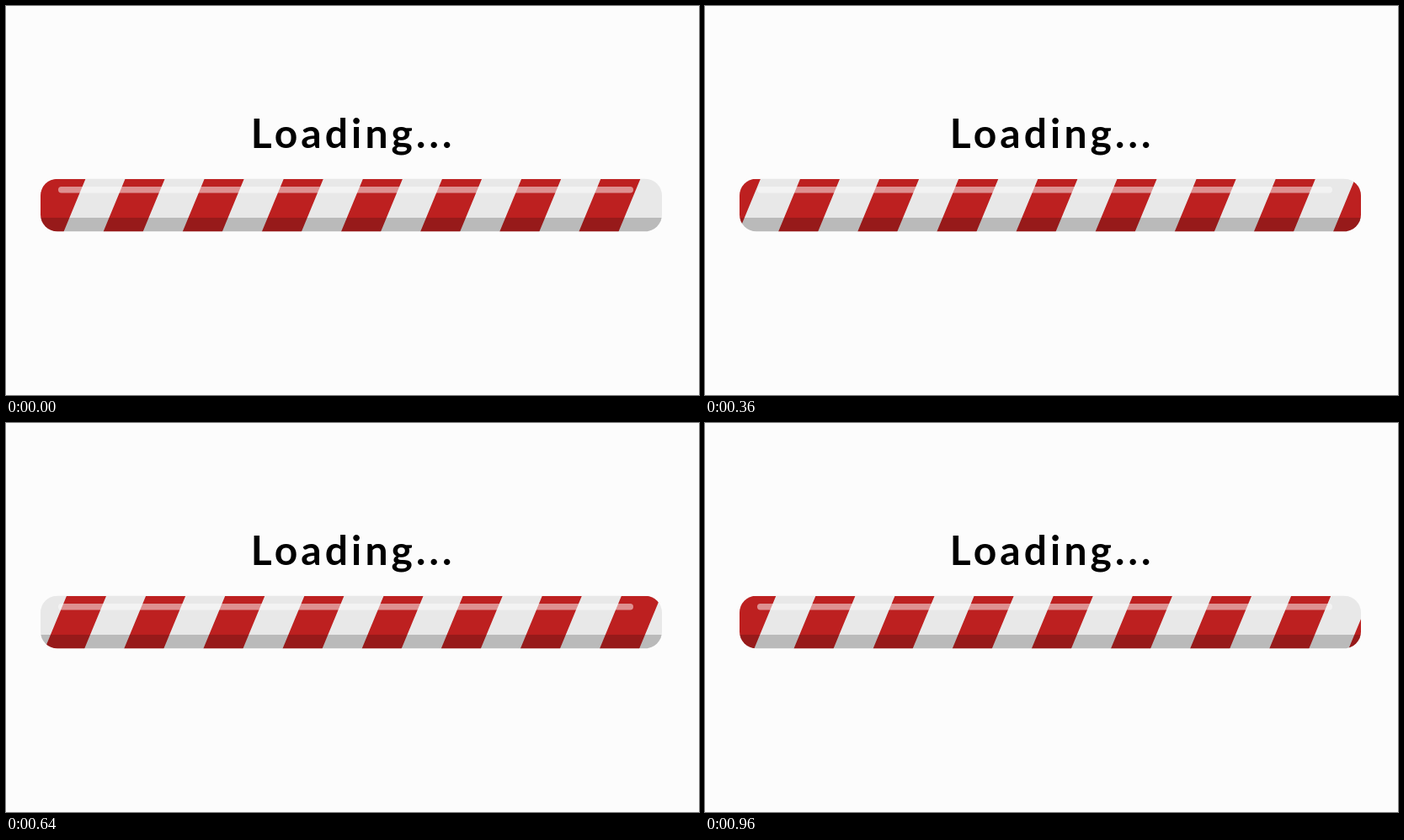
An HTML page for the animation above (1 s loop, 823 by 463 pixels).

```html
<!DOCTYPE html>
<html lang="en">
<head>
<meta charset="utf-8">
<title>Loading</title>
<style>
  html, body { margin: 0; width: 100%; height: 100%; overflow: hidden; background: #fcfcfc; }
  svg { display: block; width: 823px; height: 463px; }
  text { font: bold 48px Lato, sans-serif; letter-spacing: 4.1px; text-anchor: middle; }
</style>
</head>
<body>
<svg viewBox="0 0 823 463">
  <clipPath id="bar"><rect x="41" y="205.7" width="738" height="62.6" rx="20"/></clipPath>
  <text x="412.2" y="169.3">Loading...</text>
  <g clip-path="url(#bar)">
    <rect x="41" y="205" width="738" height="64" fill="#e8e8e8"/>
    <path id="stripes" fill="#bd2020"/>
    <rect x="41" y="252" width="738" height="17" opacity=".2"/>
  </g>
  <rect x="62" y="215" width="683" height="7.4" rx="3.7" fill="#fff" opacity=".5"/>
</svg>
<script>
  const LOOP = 1000, TICK = 40, PERIOD = 94.13, SPEED = 3.125;
  const stripes = document.getElementById('stripes');

  let d = '';
  for (let i = -2; i < 9; i++) {
    d += `M${47.3 + i * PERIOD} 206h${PERIOD / 2}l-26 63h${-PERIOD / 2}z`;
  }
  stripes.setAttribute('d', d);

  function draw(now) {
    const tick = Math.floor(now % LOOP / TICK);
    // 60 Hz motion sampled every 40 ms
    const shift = Math.floor(tick * 12 / 5) * SPEED % PERIOD;
    stripes.setAttribute('transform', `translate(${shift} 0)`);
    requestAnimationFrame(draw);
  }
  draw(performance.now());
</script>
</body>
</html>
```
